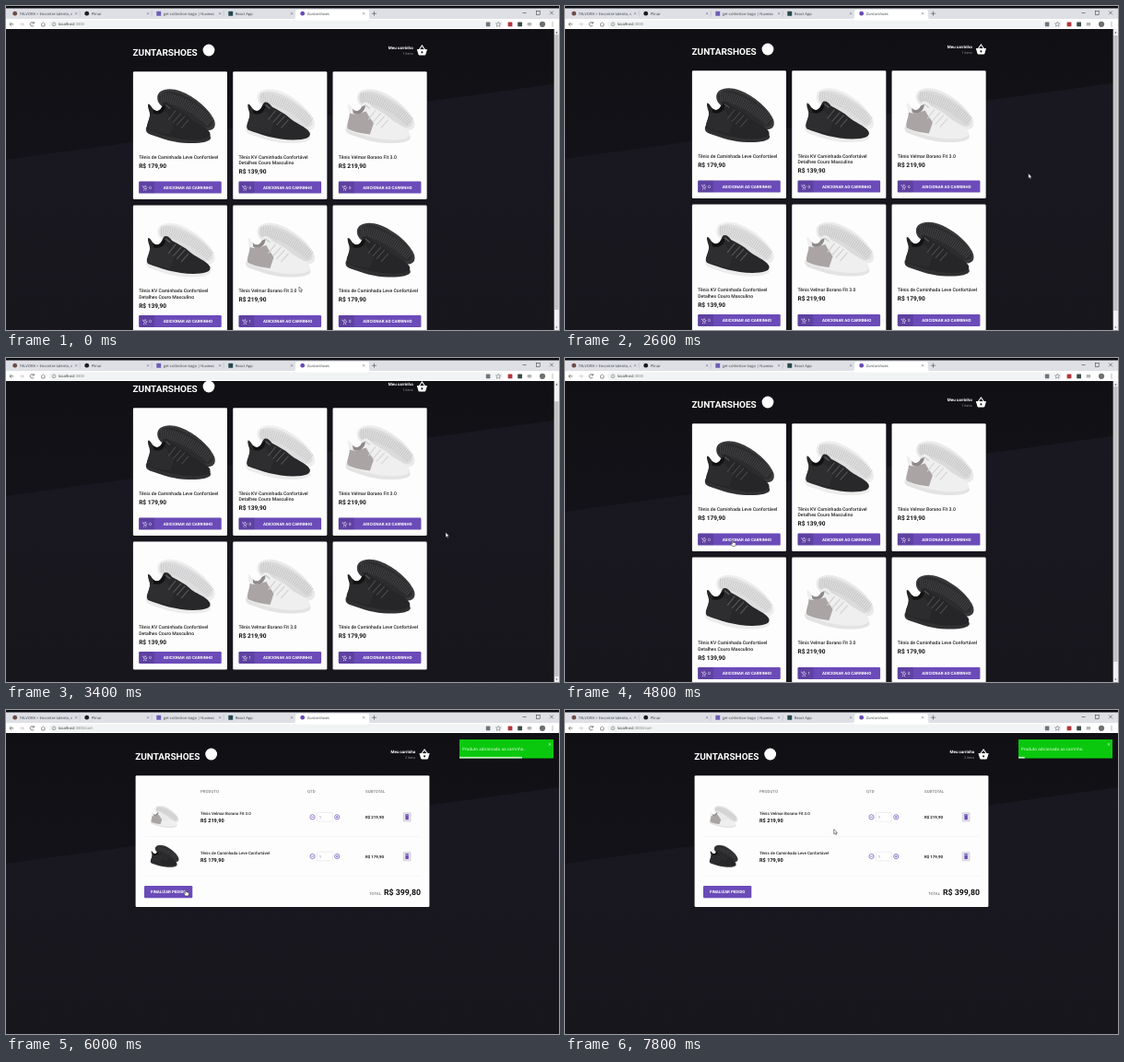
Recreate the animation shown at these times as an HTML page. Size 600 by 352 pixels, loop 8000 ms.

```html
<!DOCTYPE html>
<html lang="pt-BR">
<head>
<meta charset="utf-8">
<title>Zuntarshoes</title>
<style>
html, body { margin: 0; height: 100%; overflow: hidden; background: #17161c; }
svg { display: block; width: 100vw; height: 100vh; }
text { font-family: Roboto, Arial, sans-serif; text-rendering: geometricPrecision; white-space: pre; }
.ui { font-family: "Open Sans", "Noto Sans", sans-serif; }
.t { font-weight: 500; }
.b { font-weight: 700; }
.m { text-anchor: middle; }
.e { text-anchor: end; }
</style>
</head>
<body>
<svg id="stage" viewBox="0 0 600 352" preserveAspectRatio="none"></svg>
<script>
const LOOP = 8000, STEP = 200, CART_AT = 5000, TOAST_MS = 3000;
const PURPLE = '#6b4bb8', TOP = 25;

const rect = (x, y, w, h, fill, r = 0, more = '') =>
  `<rect x="${x}" y="${y}" width="${w}" height="${h}" rx="${r}" fill="${fill}" ${more}/>`;
const dot = (x, y, r, fill, more = '') => `<circle cx="${x}" cy="${y}" r="${r}" fill="${fill}" ${more}/>`;
const line = (d, color, w = 0.6, more = '') =>
  `<path d="${d}" fill="none" stroke="${color}" stroke-width="${w}" ${more}/>`;
const fill = (d, color) => `<path d="${d}" fill="${color}"/>`;
const text = (x, y, s, size, color, cls = '') =>
  `<text x="${x}" y="${y}" font-size="${size}" fill="${color}" class="${cls}">${s}</text>`;
const group = (x, y, inner, k = 1, id = '') =>
  `<g ${id && `id="${id}"`} transform="translate(${x} ${y}) scale(${k})">${inner}</g>`;
const cross = (x, y, r, color, w) =>
  line(`M${x - r} ${y - r}l${2 * r} ${2 * r}m0 ${-2 * r}l${-2 * r} ${2 * r}`, color, w);

// Shoe pair, about 76 by 62, origin at its top left
const tones = {
  black: { back: '#2c2c2e', rib: '#454547', rim: '#39393b', sole: '#303032', upper: '#262628', panel: '#2c2c2e', lace: '#4b4b4d', hole: '#111112' },
  mixed: { back: '#dededf', rib: '#c9c9cb', rim: '#eeeeef', sole: '#ececec', upper: '#28282a', panel: '#2e2e30', lace: '#58585a', hole: '#111112' },
  white: { back: '#dcdbdb', rib: '#c6c5c5', rim: '#ebeaea', sole: '#e4e3e3', upper: '#efefef', panel: '#aaa4a4', lace: '#d0d0d0', hole: '#8f8989' }
};
const shoes = name => {
  const c = tones[name];
  return fill('M13 12C13 4 24 0 38 5C54 11 70 25 75 37C78 47 70 50 60 46C47 41 38 31 26 26C17 22 13 18 13 12Z', c.rim) +
    fill('M15 12C16 5 26 3 38 8C53 14 69 26 73 37C74 44 68 46 60 43C48 38 39 29 28 24C19 20 15 17 15 12Z', c.back) +
    line('M17 12C34 12 55 24 71 39', c.rib, 11, 'stroke-dasharray=".8 1.5"') +
    fill('M1 44C0 48 1 50 5 52C19 57 33 61.5 46 61.5C60 62 70 60 71 56L70 52L8 41Z', c.sole) +
    fill('M3 19C5 19 6 21 8 24C11 28 16 27 18 22C19 19 20 17 22 17C25 17 27 19 29 22C36 26 43 29 48 34C54 40 66 43 70 50C72 55 66 58 52 58C34 58 16 52 3 47C-1 43 5 36 5 31C5 27 2 23 3 19Z', c.upper) +
    fill('M5 29C12 32 18 28 23 27C25 32 29 36 31 40L27 52C18 51 9 49 3 46C1 42 5 35 5 29Z', c.panel) +
    fill('M8 24C11 28 16 27 18 22L22 20C22 27 16 32 9 29Z', c.hole) +
    line('M25 36l8-10m-3 13l9-10m-5 13l9-10m-4 13l8-9', c.lace, 1.1) +
    line('M22 20L27 24', c.lace, 1.6);
};

const white = 'Tênis Velmar Borano Fit 3.0', black = 'Tênis de Caminhada Leve Confortável';
const goods = {
  black: { lines: [black], price: '179,90' },
  mixed: { lines: ['Tênis KV Caminhada Confortável', 'Detalhes Couro Masculino'], price: '139,90' },
  white: { lines: [white], price: '219,90' }
};

const trolley = (x, y) => line(`M${x} ${y}h1l1.3 2.8h2l1-2`, '#fff', 0.6) +
  dot(x + 1.8, y + 4.2, 0.5, '#fff') + dot(x + 4, y + 4.2, 0.5, '#fff') +
  line(`M${x + 3.2} ${y - 1}v2.2m-1.1-1.1h2.2`, '#fff', 0.45);

function card(kind, i, count) {
  const g = goods[kind], drop = (g.lines.length - 1) * 6.5;
  return group(137.9 + i % 3 * 108.33, 71.2 + Math.floor(i / 3) * 145.4,
    rect(0, 0, 102.1, 138.9, '#fdfdfd', 1.3) +
    group(13.3, 16.3, shoes(kind)) +
    g.lines.map((s, n) => text(6.25, 94.5 + n * 6.5, s, 5.1, '#222', 't')).join('') +
    text(6.25, 104.5 + drop, 'R$ ' + g.price, 6.56, '#111', 'b') +
    rect(6.25, 119.4, 89.6, 13, PURPLE, 1.2) +
    rect(6.25, 119.4, 17, 13, 'rgba(0,0,0,.12)', 1.2) +
    trolley(10, 124.6) +
    text(18.6, 127.6, count, 4.4, '#fff', 'm') +
    text(59.4, 127.5, 'ADICIONAR AO CARRINHO', 4.4, '#fff', 'b m'));
}

const backdrop = () => rect(-5, 0, 610, 400, 'url(#low)') + fill('M0 0H600V84L0 167Z', 'url(#top)');

const header = n =>
  text(137.5, 53.6, 'ZUNTARSHOES', 10, '#fff', 'b') +
  dot(220, 48, 6.4, '#fff') +
  text(441.7, 47.4, 'Meu carrinho', 4.5, '#fff', 'b e') +
  text(441.7, 52.9, n + ' itens', 3.85, '#8d8d92', 'e') +
  fill('M445.8 47h11.2l-1.6 5.6q-.3.9-1.2.9h-5.6q-.9 0-1.2-.9Z', '#fff') +
  line('M448.4 47.2l3-4.2 3 4.2', '#fff', 1.1) + dot(451.4, 50.3, 1.1, '#17151b');

function cartRow(kind, y) {
  const g = goods[kind], price = 'R$ ' + g.price;
  const round = (x, d) => dot(x, 0, 2.6, 'none', `stroke="${PURPLE}" stroke-width=".7"`) + line(d, PURPLE, 0.7);
  return group(0, y,
    group(156.5, -13.5, shoes(kind), 0.41) +
    text(211, -2.4, g.lines[0], 4.45, '#222', 't') +
    text(211, 6.2, price, 5.6, '#111', 'b') +
    round(332.5, 'M331.2 0h2.6') + round(359.2, 'M357.9 0h2.6m-1.3-1.3v2.6') +
    rect(337.3, -4.8, 17, 9.6, '#fff', 1, 'stroke="#ddd" stroke-width=".5"') +
    text(339.8, 1.9, '1', 4.2, '#777') +
    text(390, 1.6, price, 4.375, '#222', 'b') +
    rect(431.2, -4.6, 7.8, 9.4, '#e6e4ec', 0.4, 'stroke="#b9b6c3" stroke-width=".5"') +
    fill('M433.4 -1.5h3.4v4q0 .5-.5.5h-2.4q-.5 0-.5-.5ZM433 -2.7h1.2l.4-.5h1l.4.5h1.2v.8h-4.2Z', PURPLE));
}

const home = () => backdrop() + header(1) +
  ['black', 'mixed', 'white', 'mixed', 'white', 'black'].map((k, i) => card(k, i, i === 4 ? 1 : 0)).join('');

const cart = () => backdrop() + group(2.66, 0, header(2)) +
  rect(140.6, 71.2, 318.8, 142.8, '#fdfdfd', 1.3) +
  [[211, 'PRODUTO'], [327, 'QTD'], [390, 'SUBTOTAL']].map(([x, s]) => text(x, 90, s, 4.4, '#858585', 't')).join('') +
  cartRow('white', 116.3) + cartRow('black', 159) +
  line('M150 137.6H450M150 180.4H450', '#eee', 0.5) +
  rect(150, 191, 52.3, 13.2, PURPLE, 1.2) +
  text(176.2, 199.2, 'FINALIZAR PEDIDO', 4.4, '#fff', 'b m') +
  text(394, 201.2, 'TOTAL', 4.375, '#858585', 't') +
  text(450, 201.2, 'R$ 399,80', 8.75, '#111', 'b e');

const toast = () => rect(492, 32, 102, 20.5, '#0ac80d', 0.4) +
  text(495, 43.8, 'Produto adicionado ao carrinho.', 4.5, '#fff', 'ui') +
  cross(590, 37.3, 1.3, '#d9f7d9', 0.6) +
  rect(492, 50.9, 102, 1.6, 'rgba(255,255,255,.8)', 0, 'id="bar"');

function chrome() {
  const tabs = [
    ['TALVORA &gt; Encontre talento, c', '#6d4a44'], ['Plinar', '#1c1c1c'],
    ['get-collection-tiago | Nuvexo', '#6f5cb8'], ['React App', '#24474a'], ['Zuntarshoes', PURPLE]
  ];
  const tab = ([s, color], i) => {
    const x = 9.7 + i * 78;
    return (i === 2 || i === 3 ? rect(x - 2.4, 5.8, 4.9, 4.9, color) : dot(x, 8.2, 2.4, color)) +
      text(x + 5, 9.8, s, 4.1, '#3c4043', 'ui') + cross(x + 66.4, 8.2, 1.1, '#5f6368', 0.5) +
      (i < 3 ? line(`M${x + 70.5} 5v6.5`, '#a5a8ac', 0.4) : '');
  };
  return rect(0, 0, 600, TOP, '#fff') + rect(0, 0, 600, 14, '#dee0e6') + rect(0, 0, 600, 2.5, '#0c0c10') +
    fill('M312 14q2 0 2-2V6q0-2 2-2h76q2 0 2 2v6q0 2 2 2Z', '#fff') +
    tabs.map(tab).join('') +
    line('M397 8.2h5m-2.5-2.5v5M560.5 7.5h4', '#444', 0.6) +
    rect(575.4, 5.5, 3.8, 3.8, 'none', 0, 'stroke="#444" stroke-width=".6"') + cross(592, 7.4, 1.9, '#444', 0.6) +
    rect(46, 15.4, 493, 8.6, '#f1f3f4', 4.3) +
    line('M8.3 19.8H4m2-2l-2 2 2 2', '#555', 0.7) +
    line('M15 19.8h4.3m-2-2l2 2-2 2', '#bbb', 0.7) +
    line('M30 18.6a2.1 2.1 0 1 0 .1 2.2M30.4 17v1.9h-1.9', '#555', 0.7) +
    line('M38 20l2.3-2.2 2.3 2.2m-3.9-.4v2.4h3.2v-2.4', '#555', 0.6) +
    dot(52, 19.8, 1.9, 'none', 'stroke="#666" stroke-width=".5"') + line('M52 19.5v1.3m0-2.3v.5', '#666', 0.5) +
    `<text x="57" y="21.4" font-size="4.15" class="ui" fill="#222">localhost<tspan id="path" fill="#777"></tspan></text>` +
    rect(520.8, 17.6, 4.6, 4.6, '#70757a', 0.4) +
    line('M534.2 17.2l.8 1.7 1.9.2-1.4 1.2.4 1.9-1.7-1-1.7 1 .4-1.9-1.4-1.2 1.9-.2Z', '#5f6368', 0.5) +
    rect(544.6, 17.4, 4.8, 4.8, '#b5343a', 0.5) + rect(555.2, 17.4, 4.8, 4.8, '#3b4a46', 0.5) +
    rect(565.6, 18, 4.6, 3.6, '#b4b6ba', 0.5) + dot(582, 19.8, 3.1, '#6d6f6b') +
    dot(593, 17.8, 0.5, '#555') + dot(593, 19.8, 0.5, '#555') + dot(593, 21.8, 0.5, '#555');
}

const scrollbar = () => rect(594.7, TOP, 5.3, 352 - TOP, '#f1f1f1') +
  fill('M596.1 29.4l1.3-1.6 1.3 1.6ZM596.1 348.4l1.3 1.6 1.3-1.6Z', '#666') +
  rect(595.2, 31, 4.4, 299, '#c1c1c1', 0, 'id="thumb"');

const outline = d => `<path d="${d}" fill="#fff" stroke="#222" stroke-width=".5" stroke-linejoin="round"/>`;
const arrow = outline('M0 0V5.3L1.2 4.2L2.1 6.1L3 5.7L2.1 3.8H3.8Z');
const hand = outline('M-.6 .4Q0-.3.6.4V2.5L1.4 2.4L2.2 2.7L3 3Q3.5 3.2 3.4 4Q3.4 5.2 2.7 6.4H-.4L-2.1 4Q-2.1 3.2-1.3 3.5L-.6 4.1Z');

const stage = document.getElementById('stage');
const gradient = (id, a, b) => `<linearGradient id="${id}" x2="0" y2="1"><stop stop-color="${a}"/><stop offset="1" stop-color="${b}"/></linearGradient>`;
stage.innerHTML = `<defs>${gradient('top', '#100f13', '#131218')}${gradient('low', '#1a1821', '#17161c')}</defs>` +
  rect(0, 0, 600, 352, '#17161c') +
  `<g id="home">${group(0, 0, home(), 1, 'page')}${scrollbar()}</g>` +
  `<g id="cart">${cart()}${group(0, 0, toast(), 1, 'toast')}</g>` + chrome() +
  group(0, 0, `<g id="arrow">${arrow}</g><g id="hand">${hand}</g>`, 1, 'cursor');
const el = Object.fromEntries([...stage.querySelectorAll('[id]')].map(n => [n.id, n]));

// Tracks: [time, values...]
const pointer = [
  [0, 318, 305], [200, 319, 303], [400, 321, 300], [600, 321, 300], [1800, 381, 147],
  [2600, 502.8, 182], [2800, 491, 189], [3000, 491, 189], [3200, 488, 191], [3600, 466, 188],
  [4600, 182, 199], [4800, 182, 198], [5200, 182, 198], [5600, 166, 198], [6000, 195, 195.5],
  [6700, 195, 195.5], [7800, 291.7, 129.5]
];
const scroll = [[0, 0], [2400, 0], [2600, 1], [2800, 17], [3400, 17], [3800, 0]];
const bounce = [[0, 940], [450, -8], [560, 3], [670, -1.6], [750, 0]];

function at(track, t) {
  const i = track.findIndex(k => k[0] > t);
  if (i < 0) return track[track.length - 1].slice(1);
  const [a, b] = [track[i - 1], track[i]];
  const p = (t - a[0]) / (b[0] - a[0]), s = p * p * (3 - 2 * p);
  return a.slice(1).map((v, n) => v + (b[n + 1] - v) * s);
}
const show = (node, on) => node.setAttribute('display', on ? 'inline' : 'none');
const move = (node, x, y) => node.setAttribute('transform', `translate(${x} ${y})`);

function draw(t) {
  const inCart = t >= CART_AT, [x, y] = at(pointer, t), [top] = at(scroll, t);
  show(el.home, !inCart);
  show(el.cart, inCart);
  el.path.textContent = inCart ? ':3000/cart' : ':3000';
  move(el.page, 0, -top);
  move(el.thumb, 0, top * 0.95);
  if (inCart) {
    const age = t - CART_AT;
    move(el.toast, at(bounce, age)[0], 0);
    el.bar.setAttribute('width', 102 * Math.max(0, 1 - age / TOAST_MS));
  }
  const over = y + top > 190.5 && y + top < 203.8 &&
    (inCart ? x > 150 && x < 202 : x > 144 && x < 450 && (x - 144) % 108.33 < 89.6);
  show(el.hand, over);
  show(el.arrow, !over);
  move(el.cursor, x, y);
}

const start = performance.now();
function tick() {
  const t = (performance.now() - start) % LOOP;
  draw(Math.floor(t / STEP) * STEP);
  requestAnimationFrame(tick);
}
tick();
</script>
</body>
</html>
```
